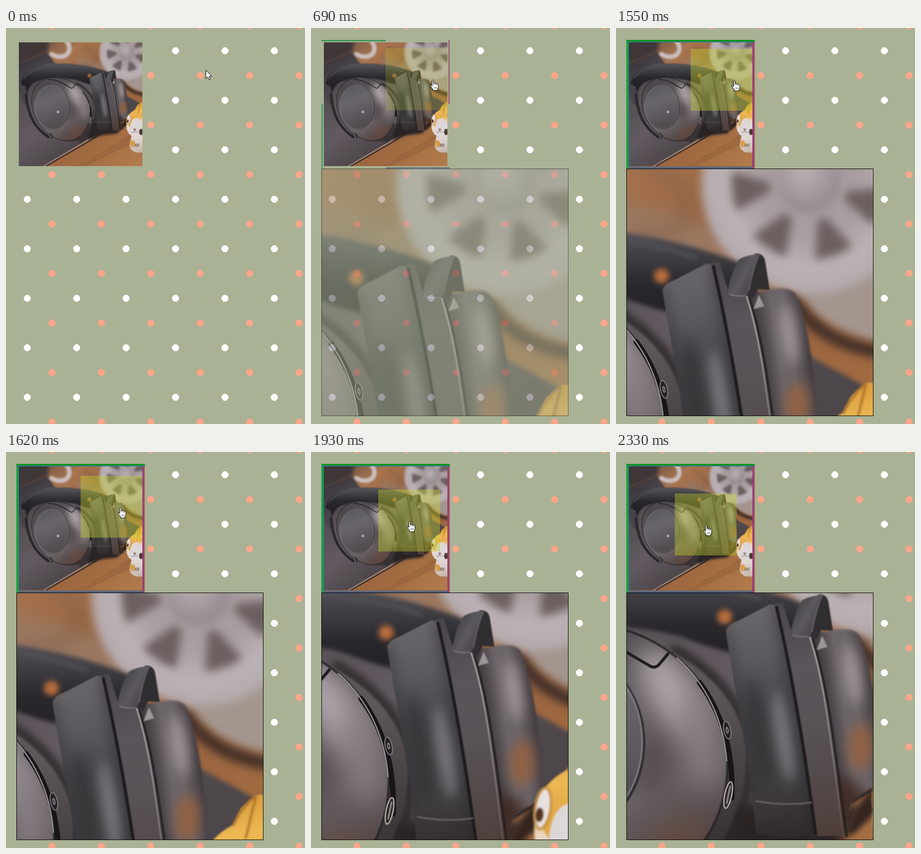
An HTML page with a canvas for the animation above (2.63 s loop, 605 by 800 pixels).

```html
<!DOCTYPE html>
<html lang="en">
<head>
<meta charset="utf-8">
<title>Image zoom</title>
<style>
html, body { margin: 0; width: 100%; height: 100%; overflow: hidden; background: #a9b294; }
canvas { display: block; }
</style>
</head>
<body>
<canvas id="stage" width="605" height="800"></canvas>
<script>
const LOOP = 2630, ZOOM = 4;
const THUMB = { x: 26, y: 29, size: 250 };
const VIEW = { x: 21, y: 284, size: 500 };
const LENS = 125;
const TICKS = [0, 150, 230, 300, 380, 460, 540, 610, 690, 770, 850, 920, 1000,
  1550, 1620, 1700, 1780, 1850, 1930, 2010, 2080, 2160, 2250, 2330];
const PATH = [[1000, 244.5, 105], [1549, 244.5, 105], [1550, 239.5, 105.5],
  [1780, 212, 126], [1930, 199, 139], [2330, 182, 147]];

const ctx = document.getElementById('stage').getContext('2d');
const clamp = (v, lo, hi) => Math.min(hi, Math.max(lo, v));
const photo = paintPhoto();
const backdrop = paintBackdrop();

function layer(w, h) {
  const c = document.createElement('canvas');
  c.width = w;
  c.height = h;
  return c;
}

function paintBackdrop() {
  const c = layer(605, 800), g = c.getContext('2d');
  g.fillStyle = '#a9b294';
  g.fillRect(0, 0, 605, 800);
  const dot = (x, y, color) => {
    g.fillStyle = color;
    for (let d = -7; d < 7; d++) {
      const w = Math.round(Math.sqrt(49 - (d + 0.5) ** 2));
      g.fillRect(x - w, y + d, 2 * w, 1);
    }
  };
  for (let i = 0; i < 6; i++) {
    for (let j = 0; j < 9; j++) {
      dot(93 + 100 * i, 100 * j - 4, '#ffa58a');
      if (j < 8) dot(43 + 100 * i, 46 + 100 * j, '#fff');
    }
  }
  return c;
}

// The picture at zoom size; the thumbnail is a reduced copy.
function paintPhoto() {
  const c = layer(1000, 1000), g = c.getContext('2d');
  const soft = r => { g.filter = r ? `blur(${r}px)` : 'none'; };
  const stops = (grad, colors) => {
    colors.forEach((k, i) => grad.addColorStop(i / (colors.length - 1), k));
    return grad;
  };
  const lin = (x0, y0, x1, y1, ...colors) => stops(g.createLinearGradient(x0, y0, x1, y1), colors);
  const rad = (x, y, r, ...colors) => stops(g.createRadialGradient(x, y, 0, x, y, r), colors);
  const fill = (d, color) => { g.fillStyle = color; g.fill(new Path2D(d)); };
  const line = (d, color, w) => {
    g.strokeStyle = color;
    g.lineWidth = w;
    g.stroke(new Path2D(d));
  };
  const oval = (x, y, rx, ry, turn, color, edge, w) => {
    g.beginPath();
    g.ellipse(x, y, rx, ry, turn, 0, 7);
    if (color) { g.fillStyle = color; g.fill(); }
    if (edge) { g.strokeStyle = edge; g.lineWidth = w; g.stroke(); }
  };
  // fills a shape, then paints light and shade inside it
  const shaded = (d, color, paint) => {
    fill(d, color);
    g.save();
    g.clip(new Path2D(d));
    paint();
    g.restore();
  };
  g.lineCap = g.lineJoin = 'round';

  // desk
  g.fillStyle = lin(0, 0, 900, 1000, '#55453d', '#a87550', '#94603e', '#a06a41', '#b07a4c');
  g.fillRect(0, 0, 1000, 1000);
  soft(3);
  for (let i = 0; i < 14; i++) {
    const y = 700 + i * 34;
    line(`M${1000 - i * 60},${y} L1010,${y - 40 - i * 26}`, i % 2 ? '#7d4f30' : '#b8804f', 5);
  }
  soft(16);
  fill('M-40,-40 H250 L230,80 L-40,200Z', '#3f3738');
  fill('M470,110 L680,170 L720,260 L480,230Z', '#9a7861');
  line('M520,40 C600,60 640,110 620,150 S560,185 520,180', '#85604a', 14);

  // mat
  soft(5);
  fill('M-20,185 L225,80 L300,180 L500,300 L860,425 L1020,512 V530 L880,596 L196,1000 L-20,1020Z',
    lin(0, 150, 500, 800, '#39353a', '#554e52', '#625a60', '#4d464a'));
  soft(2);
  line('M196,1004 L535,806 L640,742', '#b5aaa8', 6);
  line('M212,1004 L545,812 L650,748 L880,610', '#2c2425', 9);
  soft(10);
  fill('M560,650 L850,650 L800,735 L660,752 L560,790Z', '#2a2324');

  // handle
  soft(8);
  line('M385,-10 C425,35 415,100 355,114 C320,120 290,112 265,95', '#cbc0c0', 36);

  // fan
  soft(9);
  fill('M840,290 C870,350 930,390 1030,405 V200 H900Z', '#a4968f');
  line('M840,322 C880,382 940,412 1020,424', '#422f28', 26);
  oval(872, 84, 220, 221, 0, rad(872, 84, 221, '#a59b9d', '#a79c9f', '#a99fa1', '#bcb2b5', '#b3aaad'));
  soft(9);
  for (let i = 0; i < 7; i++) {
    const a = (19 + i * 360 / 7) * Math.PI / 180;
    g.beginPath();
    g.arc(869, 80, 78, a + 0.1, a - 0.1, true);
    g.arc(869, 80, 156, a - 0.26, a + 0.26);
    g.fillStyle = '#6c5f5f';
    g.fill();
  }
  soft(7);
  oval(869, 78, 64, 66, 0, rad(860, 60, 68, '#b7aeb0', '#aaa1a4', '#998f93'));

  // headband
  soft(5);
  fill('M8,385 C14,250 90,198 230,176 C400,158 570,180 730,242 V355 C600,352 560,338 480,308 ' +
    'C350,276 220,282 130,322 C90,342 64,390 62,450Z',
    lin(300, 165, 300, 345, '#5d595f', '#3f3f44', '#29282d', '#232125'));
  line('M40,290 C90,220 190,202 270,194 C390,180 520,190 640,232', '#504f54', 9);
  soft(6);
  oval(571, 269, 15, 15, 0, '#b96d3c');
  soft(2);
  fill('M4,330 L56,360 L78,470 L52,512 L14,450Z', '#474348');
  line('M58,420 C70,560 110,680 240,765', '#29262a', 20);

  // left cup: shadow, cushion, housing, disc
  soft(8);
  line('M470,335 C570,390 622,470 622,560 C615,660 590,740 500,800', '#2b2729', 18);
  soft(2);
  fill('M440,330 C560,380 618,480 614,550 C608,650 575,740 500,796 L380,800Z',
    lin(540, 420, 610, 700, '#5d575a', '#4a4447', '#3a3335'));
  soft(1);
  const housing = 'M104,470 C104,350 190,280 300,283 C400,290 475,340 520,400 C560,460 580,530 576,585 ' +
    'C570,690 500,796 400,796 C250,800 104,640 104,470Z';
  shaded(housing, lin(200, 330, 480, 800, '#4c484c', '#635c60', '#6a6265', '#4a3c39'), () => {
    soft(26);
    oval(465, 425, 45, 105, -0.55, '#aea5aa');
    oval(520, 520, 34, 100, -0.2, '#857c81');
    g.globalAlpha = 0.7;
    oval(425, 570, 30, 70, 0, '#4a4345');
    oval(465, 735, 70, 40, -0.7, '#6d4a3c');
    g.globalAlpha = 1;
  });
  soft(1);
  line(housing, '#252225', 4);
  oval(270, 524, 140, 177, 0, '#2a272a');
  oval(266, 522, 138, 174, 0, lin(200, 350, 320, 700, '#59575c', '#6a676b', '#5c585d', '#4b474a'), '#8a858a', 3);
  soft(0);
  oval(316, 562, 11, 11, 0, '#aaa7aa');
  line('M240,300 C300,300 335,320 373,341 L421,369 Q432,374 440,363 L456,344', '#211d20', 6);
  line('M250,730 L272,752 L262,778', '#211d20', 5);
  line('M520,402 C558,452 590,530 585,635', '#171517', 11);
  line('M474,352 C535,405 569,480 575,560', '#989095', 2.5);
  oval(576, 498, 7, 18, -0.2, '#242124', '#837c80', 2);
  oval(576, 498, 2, 6, -0.2, null, '#aaa2a6', 1.5);
  oval(578, 629, 7, 27, 0.2, '#262122', '#aaa09f', 3);
  line('M582,612 L575,645', '#847c7c', 4);

  // right cup: shell, plate, cushion
  soft(6);
  fill('M812,712 C850,620 875,615 900,575 L896,645 L835,705Z', '#342520');
  soft(2);
  const shell = 'M735,300 L775,300 C808,291 836,291 845,309 C868,365 887,485 883,602 ' +
    'C862,625 840,622 826,645 L812,712Z';
  shaded(shell, lin(755, 430, 885, 410, '#393438', '#4a4448', '#6b6468', '#6c6569', '#4f484b', '#2d272a'), () => {
    soft(13);
    oval(829, 385, 15, 62, -0.15, '#a1989b');
    g.globalAlpha = 0.85;
    oval(805, 655, 55, 60, 0, '#402a23');
    oval(846, 532, 24, 48, 0.05, '#99613c');
    g.globalAlpha = 1;
  });

  soft(1);
  fill('M667,244 L688,240 L705,295 L745,308 C775,405 788,520 813,712 H750 L716,436Z',
    lin(710, 250, 780, 712, '#4b474b', '#5a555a', '#585357', '#544a4a', '#4e3e3a'));
  line('M743,308 C773,400 784,505 811,712', lin(743, 308, 811, 712, '#c0b8ba', '#8e8688', '#5c4a46'), 3);
  line('M749,314 C779,405 792,520 818,712', '#242022', 4);
  const cushion = 'M573,297 Q578,284 598,277 L662,244 Q674,243 680,262 C700,350 728,500 746,636 L755,710 ' +
    'Q690,722 634,706 L626,626 C617,540 594,430 573,297Z';
  shaded(cushion, lin(620, 260, 690, 712, '#69666a', '#5c5a5e', '#49494c', '#454547', '#3f3c3e', '#302a2b'), () => {
    soft(12);
    oval(690, 510, 17, 95, -0.16, '#77757a');
    g.globalAlpha = 0.6;
    oval(640, 500, 18, 110, -0.16, '#2c2d30');
    line('M573,297 C594,430 617,540 626,626', '#28272a', 14);
    line('M676,250 C699,350 728,500 755,708', '#28262a', 18);
    g.globalAlpha = 1;
  });
  soft(1);
  line('M676,250 C699,350 728,500 755,708', '#1c1a1c', 6);
  line('M634,641 Q690,652 746,644', '#6b6466', 3);

  // hinge tab
  fill('M760,224 Q778,222 781,240 L790,297 L766,296 L757,315 L741,308Z', '#312e31');
  fill('M705,302 C708,276 718,250 727,237 Q733,229 768,224 C760,247 752,272 748,298 ' +
    'Q746,311 736,310 L713,309 Q705,309 705,302Z', lin(710, 250, 765, 280, '#454246', '#5c595e', '#474448'));
  line('M709,306 Q728,312 740,308', '#817a7f', 2);
  line('M768,226 C758,250 752,272 748,298', '#6f696f', 2);
  fill('M757,336 L768,307 L779,330Z', '#9d9698');

  // figurine
  soft(2);
  fill('M872,650 C876,590 905,565 939,546 L956,512 L984,487 Q993,482 1010,490 V890 H950 C900,875 890,840 904,795 ' +
    'L912,755 C880,735 866,695 872,650Z', lin(900, 500, 990, 880, '#e5ad45', '#e7b45a', '#e8e1dd', '#dcd3cf', '#c9b9ad'));
  fill('M873,640 C877,590 905,565 939,546 L956,512 L984,487 L1010,490 V615 C950,585 925,610 903,690Z',
    lin(930, 490, 950, 640, '#d99a3a', '#ecb955', '#e0a545'));
  fill('M900,690 C905,600 960,595 1000,650 V745 C960,775 900,755 886,715Z', '#ded7d8');
  line('M939,546 C950,522 970,496 985,488 C976,520 970,550 964,572', '#a56c28', 4);
  oval(888, 624, 16, 42, 0.15, '#e6e0df', '#c18431', 4);
  oval(881, 637, 8, 14, 0.1, '#51341f');
  oval(990, 724, 17, 25, 0, '#4b3a30');
  fill('M926,700 Q940,690 950,706 L938,714Z', '#8f6756');
  line('M936,714 Q930,732 915,727 M936,714 Q948,732 960,724', '#6b5146', 3);
  fill('M905,795 C930,785 945,800 940,835 L915,852 Q897,825 905,795Z', '#d89c48');
  for (let i = 0; i < 3; i++) line(`M${945 + i * 13},820 l-4,22`, '#4a3b35', 5);
  return c;
}

function cursorAt(t) {
  if (t < 1000) {
    const e = 1 - (1 - clamp((t - 80) / 680, 0, 1)) ** 2;
    return t < 150 ? [404.5, 85.5] : [404.5 - 160 * e, 85 + 20 * e];
  }
  const i = PATH.findIndex(k => k[0] > t);
  if (i < 0) return PATH[PATH.length - 1].slice(1);
  const [a, b] = [PATH[i - 1], PATH[i]], f = (t - a[0]) / (b[0] - a[0]);
  return [a[1] + (b[1] - a[1]) * f, a[2] + (b[2] - a[2]) * f];
}

const ARROW = new Path2D('M0,0 V16.5 L3.8,13 L6.6,19 L9,18 L6.4,12 H11.8Z');
const HAND = new Path2D('M-1.5,1.5 Q0,-.8 1.5,1.5 V7 Q3.6,5.6 5,7.5 Q6.8,6.4 8,8.5 Q10.4,7.6 11,10 V15 ' +
  'Q11,17 9.5,18.5 V21.5 H0 V19 Q-3,15.5 -5,12.5 Q-5.6,9.8 -3.5,10.5 L-1.5,13Z');
const KNUCKLES = new Path2D('M1.5,7 V10.5 M5,7.5 V11 M8,8.5 V11.5 M2.5,14.5 V18 M5,14.5 V18 M7.5,14.5 V18');

function drawCursor(x, y, over) {
  ctx.save();
  ctx.translate(Math.floor(x) + 0.5, Math.floor(y) + 0.5);
  ctx.fillStyle = '#fff';
  ctx.strokeStyle = '#000';
  ctx.lineWidth = 1;
  ctx.fill(over ? HAND : ARROW);
  ctx.stroke(over ? HAND : ARROW);
  if (over) {
    ctx.lineWidth = 0.7;
    ctx.stroke(KNUCKLES);
  }
  ctx.restore();
}

function drawFrame(p) {
  const x0 = 21, y0 = 24, side = 260;
  const len = Math.round(side * p), w = Math.round(1 + 4 * p), w1 = Math.ceil(w * 0.6), w2 = w - w1;
  const bar = (color, x, y, bw, bh) => { ctx.fillStyle = color; ctx.fillRect(x, y, bw, bh); };
  const right = x0 + side, bottom = y0 + side;
  ctx.globalAlpha = 0.4 + 0.6 * p;
  bar('#4f6688', right - len, bottom - w1, len, w1);
  bar('#866952', right - len, bottom - w, len, w2);
  bar('#b0605f', right - w2, y0, w2, len);
  bar('#963a78', right - w, y0, w1, len);
  bar('#1a9b3c', x0, bottom - len, w1, len);
  bar('#0d9a78', x0 + w1, bottom - len, w2, len);
  bar('#0c9618', x0, y0, len, w1);
  bar('#2b8189', x0, y0 + w1, len, w2);
  ctx.globalAlpha = 1;
}

function draw(t) {
  const [x, y] = cursorAt(t);
  const over = x < THUMB.x + THUMB.size;
  const p = clamp((t - 440) / 500, 0, 1);
  ctx.imageSmoothingQuality = 'high';
  ctx.drawImage(backdrop, 0, 0);
  ctx.drawImage(photo, THUMB.x, THUMB.y, THUMB.size, THUMB.size);
  if (p > 0) {
    const room = THUMB.size - LENS;
    const lx = clamp(Math.floor(x - 63) - THUMB.x, 0, room);
    const ly = clamp(Math.floor(y - 63) - THUMB.y, 0, room);
    drawFrame(p);
    ctx.globalAlpha = p;
    ctx.fillStyle = 'rgba(195,210,45,.4)';
    ctx.fillRect(THUMB.x + lx, THUMB.y + ly, LENS, LENS);
    ctx.drawImage(photo, lx * ZOOM, ly * ZOOM, VIEW.size, VIEW.size, VIEW.x, VIEW.y, VIEW.size, VIEW.size);
    ctx.strokeStyle = '#000';
    ctx.lineWidth = 1;
    ctx.strokeRect(VIEW.x + 0.5, VIEW.y + 0.5, VIEW.size - 1, VIEW.size - 1);
    ctx.globalAlpha = 1;
  }
  drawCursor(x, y, over);
}

const start = performance.now();
function tick() {
  const t = (performance.now() - start) % LOOP;
  draw(TICKS.filter(k => k <= t).pop());
  requestAnimationFrame(tick);
}
tick();
</script>
</body>
</html>
```
